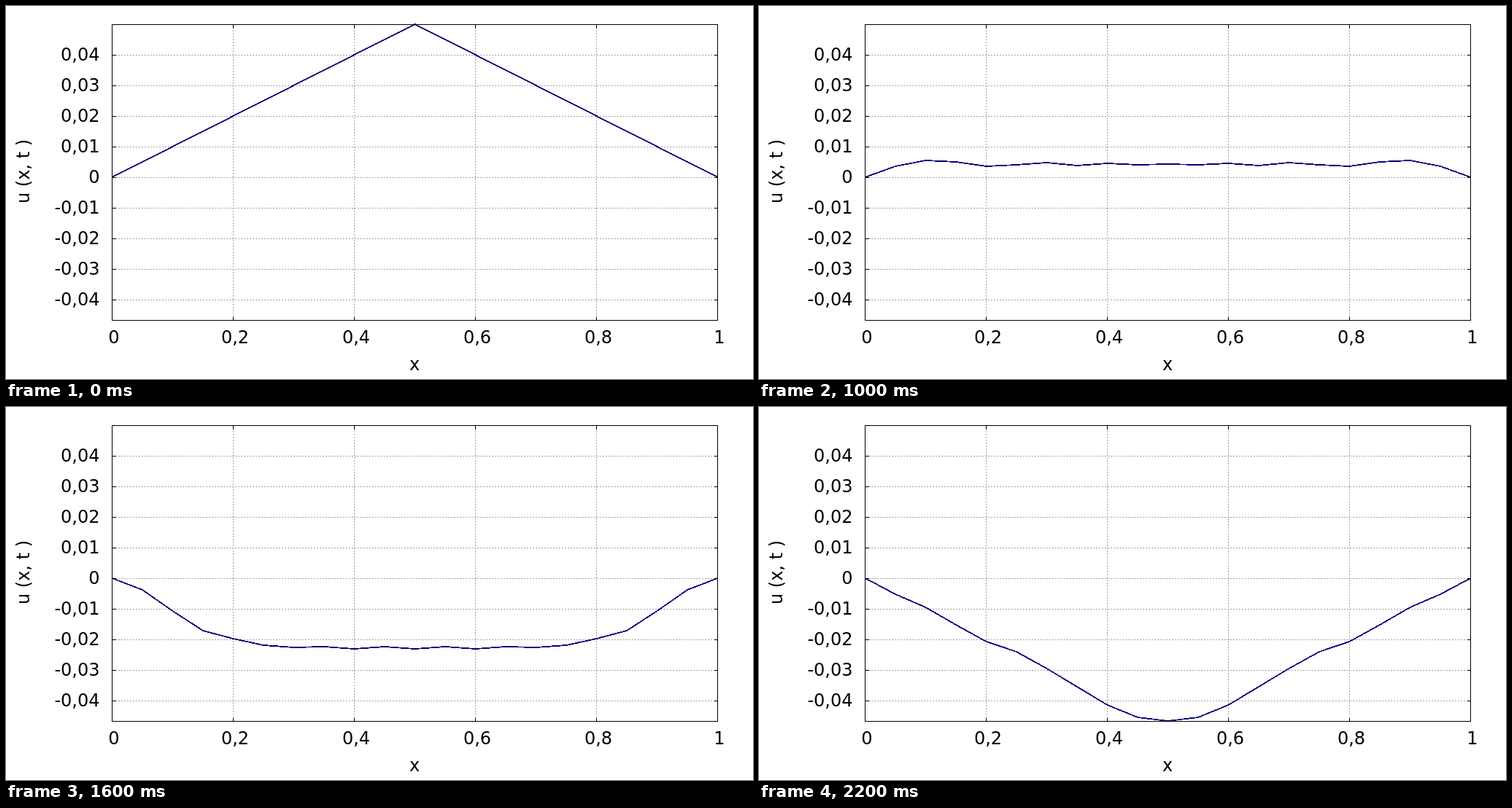
Write an HTML page that moves like this. It is 1024 px wide and 512 px high and loops after 2.3 s.

```html
<!DOCTYPE html>
<html lang="en">
<head>
<meta charset="utf-8">
<title>Plucked string</title>
<style>
  html, body { margin: 0; width: 100%; height: 100%; overflow: hidden; background: #fff; }
  svg { display: block; width: 100%; height: 100%; }
  text { font: 24px "DejaVu Sans", sans-serif; fill: #000; }
  path { fill: none; shape-rendering: crispEdges; }
  .grid { stroke: #a0a0a0; stroke-dasharray: 2 2; }
  .axis { stroke: #000; }
  .string { stroke: #000080; stroke-width: 1.8; }
</style>
</head>
<body>
<svg viewBox="0 0 1024 512"></svg>
<script>
const svg = document.querySelector('svg');
const LEFT = 145.5, RIGHT = 975.5, TOP = 25.5, BOTTOM = 431.5;
const FRAME_MS = 100, FRAMES = 23;
const CELLS = 20, HEIGHT = 0.05;

const px = x => LEFT + 830 * x;
const py = u => 235 - 4200 * u;

function add(tag, attrs, text = '') {
  const el = document.createElementNS('http://www.w3.org/2000/svg', tag);
  for (const key in attrs) el.setAttribute(key, attrs[key]);
  el.textContent = text;
  return svg.appendChild(el);
}

const label = (x, y, anchor, text, more = {}) =>
  add('text', { x, y, 'text-anchor': anchor, ...more }, text);
const comma = v => String(v).replace('.', ',');

// Grid, ticks and labels
let grid = '', ticks = '';
for (let i = -4; i <= 4; i++) {
  const y = py(i / 100) + 0.5;
  grid += `M${LEFT + 0.5} ${y}H${RIGHT}`;
  ticks += `M${LEFT} ${y}h5M${RIGHT} ${y}h-5`;
  label(128.5, y + 7.5, 'end', comma(i / 100));
}
for (let i = 0; i <= 5; i++) {
  const x = px(i / 5);
  if (i % 5) {
    grid += `M${x} ${BOTTOM - 0.5}V${TOP}`;
    ticks += `M${x} ${BOTTOM}v-5M${x} ${TOP}v5`;
  }
  label(x + 2.5, 463, 'middle', comma(i / 5));
}
label(560, 500, 'middle', 'x');
label(0, 0, 'middle', 'u (x, t )', { transform: 'translate(32 227) rotate(-90)' });

add('path', { class: 'grid', d: grid });
const string = add('path', { class: 'string' });
add('path', { class: 'axis', d: `${ticks}M${LEFT} ${TOP}H${RIGHT}V${BOTTOM}H${LEFT}Z` });

// Height of mesh point j: the odd modes of a string of CELLS links,
// released at rest from a triangle; t is in links travelled.
function height(j, t) {
  if (t === 0) return HEIGHT - Math.abs(j / CELLS - 0.5) / 10;
  let u = 0;
  for (let n = 1; n < CELLS; n += 2) {
    const k = n * Math.PI / CELLS, s = Math.sin(k / 2);
    u += Math.sin(n * Math.PI / 2) / s ** 2 * Math.sin(k * j) * Math.cos(2 * s * t);
  }
  return u * HEIGHT / 200;
}

function shape(frame) {
  const t = frame && 0.15 + 0.9 * frame;
  const points = Array.from({ length: CELLS + 1 },
    (_, j) => `${px(j / CELLS)} ${Math.round(py(height(j, t)))}`);
  return 'M' + points.join('L');
}

function draw(ms) {
  string.setAttribute('d', shape(Math.floor(ms / FRAME_MS) % FRAMES));
}

const start = performance.now();
function tick() {
  draw(performance.now() - start);
  requestAnimationFrame(tick);
}
tick();
</script>
</body>
</html>
```
